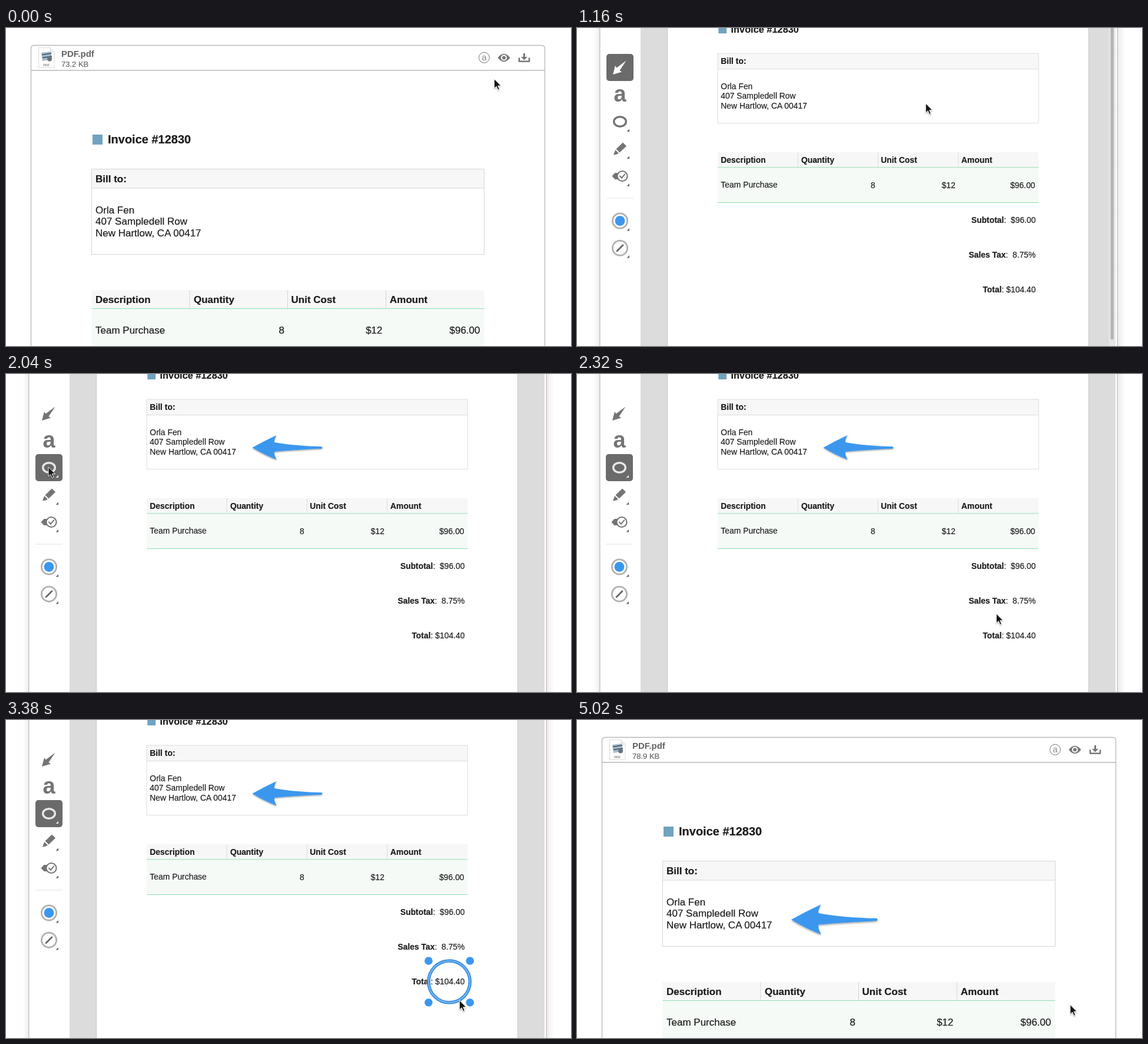
An HTML page that plays this animation: 960 by 540 pixels, repeating every 5.04 s.

```html
<!DOCTYPE html>
<html lang="en">
<head>
<meta charset="utf-8">
<title>Invoice markup</title>
<style>
  html, body { margin: 0; width: 100%; height: 100%; overflow: hidden; background: #fff; }
  svg { display: block; width: 960px; height: 540px; font-family: "Liberation Sans", Arial, sans-serif; }
  .b { font-weight: 700; }
  .end { text-anchor: end; }
  .line { fill: none; stroke: currentColor; stroke-linecap: round; stroke-linejoin: round; }
  #invoice text { stroke: #1b1b1b; stroke-width: .2; }
</style>
</head>
<body>
<svg viewBox="0 0 960 540">
  <defs>
    <linearGradient id="shade">
      <stop offset="0" stop-color="#fff"/>
      <stop offset="1" stop-color="#efebec"/>
    </linearGradient>
    <filter id="soft" x="-20%" y="-40%" width="140%" height="200%">
      <feDropShadow dx="0" dy="1.5" stdDeviation="1.2" flood-opacity=".35"/>
    </filter>

    <g id="invoice" fill="#1b1b1b" font-size="17">
      <rect x="147" y="181" width="17" height="17" fill="#6fa3bf"/>
      <text class="b" x="173" y="196" font-size="20">Invoice #12830</text>

      <rect x="145.5" y="239.5" width="667" height="32.5" fill="#f7f7f7"/>
      <path d="M145.5 239.5H812.5V384.5H145.5ZM145.5 272H812.5" fill="none" stroke="#d9d3d5"/>
      <text class="b" x="152" y="261.5">Bill to:</text>
      <text x="152" y="314.5">Orla Fen</text>
      <text x="152" y="334">407 Sampledell Row</text>
      <text x="152" y="354">New Hartlow, CA 00417</text>

      <rect x="145.5" y="445" width="667" height="31.5" fill="#f7f7f7"/>
      <rect x="145.5" y="476.5" width="667" height="73" fill="#f5faf7"/>
      <path d="M312 445V476M478.5 445V476M645.5 445V476" stroke="#d9d3d5"/>
      <path d="M145.5 476.5H812.5M145.5 549.5H812.5" stroke="#8fdeb2" stroke-width="1.2"/>
      <g class="b">
        <text x="152" y="467">Description</text>
        <text x="319" y="467">Quantity</text>
        <text x="484.5" y="467">Unit Cost</text>
        <text x="652" y="467">Amount</text>
      </g>
      <text x="152" y="518.5">Team Purchase</text>
      <g class="end">
        <text x="473" y="519">8</text>
        <text x="639.5" y="519">$12</text>
        <text x="805.5" y="519">$96.00</text>
        <text x="806.5" y="592"><tspan class="b">Subtotal</tspan>:&#160;&#160;$96.00</text>
        <text x="806.5" y="664"><tspan class="b">Sales Tax</tspan>:&#160;&#160;8.75%</text>
        <text x="806.5" y="736"><tspan class="b">Total</tspan>: $104.40</text>
      </g>
    </g>

    <path id="arrow" filter="url(#soft)" fill="#3b97ee" d="M-118.5 0Q-99-11-77.5-21Q-82-13-81-9Q-50-3-1-1.8Q2.5 0-1 1.8Q-50 4-81 7Q-82 12-77 20.5Q-99 12-118.5 0Z"/>
    <path id="corner" d="M0 0V-4.5L-4.5 0Z"/>
  </defs>

  <g id="card">
    <path d="M42.5 545V35Q42.5 29.5 48 29.5H910Q915.5 29.5 915.5 35V545M42.5 72H915.5" fill="none" stroke="#b8b8b8" stroke-width="1.3"/>
    <g id="file">
      <path d="M55.5 33.5H75L82 41V67.5H55.5Z" fill="#fdfdfd" stroke="#dcdcdc"/>
      <path d="M75 33.5V41H82" fill="#eee" stroke="#dcdcdc"/>
      <path d="M60 42L76 40L78 53L62 56Z" fill="#a9bccb"/>
      <path d="M61 45.5L77 43M62 50.5L78 48" stroke="#4d6478" stroke-width="2"/>
      <circle cx="74" cy="52.5" r="4" fill="#68737d"/>
      <text x="68.7" y="65" font-size="5.5" class="b" text-anchor="middle" fill="#888">PDF</text>
    </g>
    <text class="b" x="94" y="48.5" font-size="15" fill="#636363">PDF.pdf</text>
    <text id="size" x="94" y="66" font-size="13" fill="#666" stroke="#666" stroke-width=".2"></text>
    <g color="#777" fill="#777">
      <circle cx="812.5" cy="50.3" r="9" class="line" stroke-width="1"/>
      <text x="812.5" y="54.5" font-size="15" text-anchor="middle" fill="#888">a</text>
      <path d="M835.5 50.5Q846 37 856.5 50.5Q846 64 835.5 50.5Z"/>
      <circle cx="846" cy="50.5" r="5" fill="#fff"/>
      <circle cx="846" cy="50.5" r="3"/>
      <path d="M879 43H882V49H886L880.5 54.5L875 49H879Z"/>
      <path d="M872 51.5V56.7H889V51.5" class="line" stroke-width="2.6"/>
    </g>
    <use href="#invoice"/>
    <use id="savedArrow" href="#arrow" transform="translate(510 339) scale(1.232)"/>
  </g>

  <g id="editor">
    <rect width="960" height="540" fill="#fff"/>
    <rect x="29" width="10" height="540" fill="url(#shade)"/>
    <rect width="12" height="540" fill="url(#shade)" transform="matrix(-1 0 0 1 931 0)"/>
    <rect x="39" width="879" height="540" fill="#fff"/>
    <path d="M38.8 0V540M918.3 0V540" stroke="#c3b9bd" stroke-width="1.3"/>
    <rect x="108" width="807" height="540" fill="#dcdcdc"/>
    <rect x="153.5" y="-2" width="716" height="544" fill="#fff" stroke="#c6c6c6"/>
    <g id="scrollbar">
      <rect x="904" width="11" height="540" fill="#e6e6e6"/>
      <rect x="906.5" y="-10" width="5.5" height="539" rx="2.7" fill="#b4b4b4"/>
    </g>
    <use href="#invoice" transform="translate(120.1 -152.7) scale(.8175)"/>

    <g id="toolbar">
      <rect id="active" x="50" width="46" height="46" rx="5" fill="#6b6b6b"/>
      <path id="arrowTool" d="M83.5 55.5L72.5 72L76 74.5L61 79L65 64L67.5 67.5Z"/>
      <text x="73" y="124.5" font-size="38" class="b" text-anchor="middle" fill="#747474">a</text>
      <ellipse id="ovalTool" cx="73" cy="159" rx="10.3" ry="8.2" fill="none" stroke-width="3.4"/>
      <g fill="#747474">
        <path d="M78 194.5L84 200.5L72.5 211.5L66.5 205.5Z"/>
        <path d="M65.2 207L71 212.8L67.5 214.5L62 215.5Z"/>
        <path d="M59.5 251.5L64.5 246H73V257H64.5Z"/>
      </g>
      <g color="#747474" class="line" stroke-width="2">
        <circle cx="77" cy="251.5" r="8.5" fill="#fff"/>
        <path d="M73 251.5L76 254.7L81.2 248.3"/>
      </g>
      <path d="M50 289H96" stroke="#e2e2e2" stroke-width="1.2"/>
      <g fill="#fff" stroke="#b0b0b0" stroke-width="2.8">
        <circle cx="73" cy="327.5" r="12.6"/>
        <circle cx="73" cy="373.7" r="12.6"/>
      </g>
      <circle cx="73" cy="327.5" r="8.4" fill="#3b97ee"/>
      <path d="M68 378.7L78 368.7" stroke="#666" stroke-width="2.8" stroke-linecap="round"/>
      <use id="ovalCorner" href="#corner" x="89" y="176"/>
      <g fill="#666">
        <use href="#corner" x="89" y="222"/>
        <use href="#corner" x="89" y="268.5"/>
        <use href="#corner" x="89" y="344.5"/>
        <use href="#corner" x="89" y="390.5"/>
      </g>
    </g>

    <use id="drawnArrow" href="#arrow"/>
    <g id="oval" fill="none">
      <ellipse stroke="#3b8fe0" stroke-width="5.6"/>
      <ellipse id="highlight" stroke="#83bdf4" stroke-width="1.6"/>
    </g>
    <g id="handles" fill="#3b97ee">
      <circle cx="718" cy="409" r="6.8"/>
      <circle cx="788.3" cy="409" r="6.8"/>
      <circle cx="718" cy="479.7" r="6.8"/>
      <circle cx="788.3" cy="479.7" r="6.8"/>
    </g>
  </g>

  <path id="cursor" filter="url(#soft)" d="M0 0V16L3.7 12.6L6.3 18.6L8.9 17.5L6.3 11.6H11.4Z" fill="#161616" stroke="#fff" stroke-width=".9"/>
</svg>
<script>
const LOOP = 5040;
const $ = id => document.getElementById(id);
const clamp = v => Math.max(0, Math.min(1, v));
const span = (t, from, to) => clamp((t - from) / (to - from));
const ease = p => p * p * (3 - 2 * p);
const set = (el, attrs) => Object.entries(attrs).forEach(([k, v]) => el.setAttribute(k, v));
const show = (id, on) => set($(id), { display: on ? 'inline' : 'none' });

// time, x, y of the pointer tip
const path = [
  [0, 829.5, 86.5], [60, 829.5, 86.5], [340, 812, 48], [800, 812, 48],
  [1160, 592.5, 128], [1280, 537, 124], [1320, 537, 124], [1560, 417.5, 121.5],
  [1700, 417.5, 121.5], [2000, 72, 158], [2080, 72, 158], [2320, 712.5, 407],
  [2440, 718, 408], [2500, 718, 408], [2940, 788, 479], [3060, 788, 479],
  [3260, 770.5, 476], [3440, 770.5, 476], [3680, 838, 483.5], [LOOP, 838, 483.5]
];

function pointer(t) {
  const i = path.findIndex(k => k[0] > t);
  const [t0, x0, y0] = path[i - 1], [t1, x1, y1] = path[i];
  const p = ease(span(t, t0, t1));
  return [x0 + (x1 - x0) * p, y0 + (y1 - y0) * p];
}

function render(t) {
  const [x, y] = pointer(t);
  set($('cursor'), { transform: `translate(${x} ${y})` });

  const open = span(t, 660, 820) * (1 - span(t, 3820, 3980));
  set($('editor'), { opacity: open });
  show('editor', open > 0);

  const saved = t >= 4500;
  $('size').textContent = saved ? '78.9 KB' : '73.2 KB';
  show('savedArrow', saved);
  set($('scrollbar'), { opacity: 1 - span(t, 1200, 1400) });

  const ovalActive = t >= 2040;
  set($('active'), { y: ovalActive ? 136 : 44 });
  set($('arrowTool'), { fill: ovalActive ? '#747474' : '#fff' });
  set($('ovalTool'), { stroke: ovalActive ? '#e8e8e8' : '#747474' });
  set($('ovalCorner'), { fill: ovalActive ? '#e8e8e8' : '#666' });
  set($('toolbar'), { transform: `translate(${t >= 2180 && t < 2700 ? -1 : 0} 0)` });

  const reach = ease(span(t, 1320, 1560));
  show('drawnArrow', reach > 0);
  set($('drawnArrow'), { transform: `translate(537 125) scale(${reach})` });

  const grow = ease(span(t, 2500, 2940));
  show('oval', grow > 0);
  show('handles', t >= 2960);
  show('highlight', t >= 2960);
  const rx = 35.2 * grow, ry = 35.4 * grow;
  for (const el of $('oval').children) set(el, { cx: 718 + rx, cy: 409 + ry, rx, ry });
}

const start = performance.now();
function tick() {
  render((performance.now() - start) % LOOP);
  requestAnimationFrame(tick);
}
tick();
</script>
</body>
</html>
```
